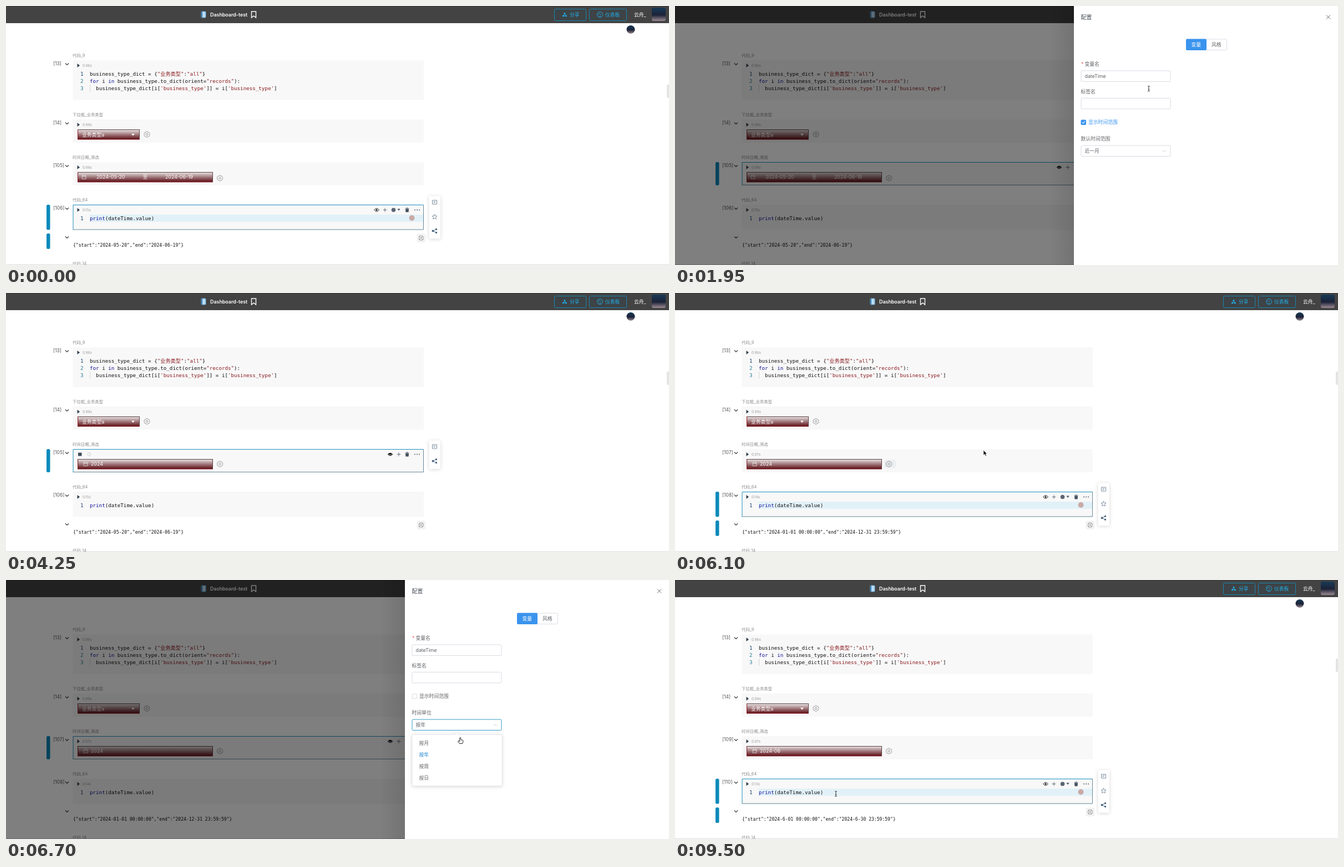
Recreate the animation shown at these times as an HTML page. Size 1195 px wide and 468 px high, loop 9970 ms.

```html
<!DOCTYPE html>
<html lang="zh">
<head>
<meta charset="utf-8">
<title>Dashboard-test</title>
<style>
html, body { margin: 0; width: 100%; height: 100%; overflow: hidden; background: #fff; }
svg { display: block; width: 100vw; height: 100vh; }
text { font-family: Inter, "Noto Sans CJK SC", "Noto Sans CJK", sans-serif; white-space: pre; }
.code { font-family: "DejaVu Sans Mono", "Noto Sans CJK SC", "Noto Sans CJK", monospace; }
.float { filter: drop-shadow(0 1px 3px rgba(0,0,0,.16)); }
</style>
</head>
<body>
<svg viewBox="0 0 1195 468" preserveAspectRatio="none">
  <defs>
    <linearGradient id="wine" x2="0" y2="1">
      <stop stop-color="#e9e3e3"/><stop offset=".45" stop-color="#a78386"/><stop offset="1" stop-color="#5d0d14"/>
    </linearGradient>
    <linearGradient id="photo" x2="0" y2="1">
      <stop stop-color="#173a56"/><stop offset=".55" stop-color="#1c2238"/><stop offset="1" stop-color="#9d8b93"/>
    </linearGradient>
    <linearGradient id="edge"><stop stop-opacity="0"/><stop offset="1" stop-opacity=".16"/></linearGradient>
  </defs>
  <g id="scene"></g>
</svg>
<script>
const LOOP = 9970;
const BLUE = '#0a8abb', PRIMARY = '#3a94ee', INK = '#44505e', GREY = '#606266', NAVY = '#10109a', RED = '#8a1a1e';

// Cursor: time, x, y, shape used from this time on ('' hides it)
const CURSOR = [
  [0, 290, 386, ''], [250, 290, 386, 'beam'], [500, 330, 360, 'arrow'], [1100, 385, 307, 'hand'],
  [1200, 385, 307, 'arrow'], [1300, 843, 247, 'arrow'], [1750, 853, 160, 'beam'], [1950, 854, 149, 'beam'],
  [2100, 850, 152, 'arrow'], [2350, 737, 208, 'hand'], [2600, 737, 208, 'arrow'], [2800, 812, 260, 'hand'],
  [2950, 812, 260, 'hand'], [3200, 778, 296, 'hand'], [3350, 770, 338, 'hand'], [3500, 760, 314, 'hand'],
  [4200, 760, 314, ''], [4400, 560, 325, 'arrow'], [4700, 320, 378, 'beam'], [4850, 290, 386, 'beam'],
  [5900, 290, 386, 'arrow'], [6000, 386, 307, 'arrow'], [6100, 554, 284, 'arrow'], [6250, 840, 262, 'arrow'],
  [6400, 815, 261, 'hand'], [6550, 815, 261, 'hand'], [6700, 819, 285, 'hand'], [6850, 790, 296, 'hand'],
  [6900, 786, 296, 'hand'], [7700, 786, 296, ''], [7900, 560, 330, 'arrow'], [8450, 320, 378, 'beam'],
  [8650, 290, 386, 'beam'], [LOOP, 290, 386, 'beam']
];

const clamp = v => Math.max(0, Math.min(1, v));
const ramp = (t, start, length) => clamp((t - start) / length);
const easeOut = p => 1 - (1 - p) ** 2.2;
// Last value whose start time has passed
const at = (t, ...steps) => steps.filter(s => s[0] <= t).pop()[1];
const within = (t, ...spans) => spans.some(([a, b]) => t >= a && t < b);

const escape = s => String(s).replace(/&/g, '&amp;').replace(/</g, '&lt;');
const text = (x, y, s, size = 8.8, fill = GREY, extra = '') =>
  `<text x="${x}" y="${y + size * .36}" font-size="${size}" fill="${fill}" ${extra}>${escape(s)}</text>`;
const rect = (x, y, w, h, fill = 'none', stroke = 'none', r = 0, extra = '') =>
  `<rect x="${x}" y="${y}" width="${w}" height="${h}" rx="${r}" fill="${fill}" stroke="${stroke}" ${extra}/>`;
const circle = (x, y, r, fill = 'none', stroke = 'none', extra = '') =>
  `<circle cx="${x}" cy="${y}" r="${r}" fill="${fill}" stroke="${stroke}" ${extra}/>`;
const line = (x, y, d, stroke = INK, width = 1, fill = 'none') =>
  `<path transform="translate(${x} ${y})" d="${d}" stroke="${stroke}" stroke-width="${width}" fill="${fill}"/>`;
const shape = (x, y, d, fill = INK) => line(x, y, d, 'none', 0, fill);
// Code as [text, colour] pairs
const code = (x, y, parts, size = 9.2) =>
  `<text class="code" x="${x}" y="${y + size * .36}" font-size="${size}" style="font-family:'DejaVu Sans Mono','Noto Sans CJK SC',monospace">` +
  parts.map(([s, fill = '#111']) => `<tspan fill="${fill}">${escape(s)}</tspan>`).join('') + '</text>';

const icons = {
  chevron: (x, y) => line(x, y, 'M-3 -1.5L0 1.5L3 -1.5', '#333', 1.1),
  play: (x, y) => shape(x, y, 'M-2 -3.5L2.5 0L-2 3.5Z', '#333f4d'),
  plus: (x, y) => line(x, y, 'M-3.5 0H3.5M0 -3.5V3.5', INK, .8),
  dots: (x, y) => [-4, 0, 4].map(d => circle(x + d, y, .9, INK)).join(''),
  trash: (x, y) => shape(x, y, 'M-3.5 -3H-1V-4H1V-3H3.5V-2H-3.5ZM-3 -1.4H3L2.6 4H-2.6Z'),
  eye: (x, y) => line(x, y, 'M-4.5 0Q0 -5.5 4.5 0Q0 5.5 -4.5 0Z', '#222', 1) + circle(x, y, 1.5, '#222'),
  shut: (x, y) => shape(x, y, 'M-4.8 0Q0 -5.4 4.8 0Q0 5.4 -4.8 0Z', '#111') + line(x, y, 'M-3 .4Q0 2 3 .4', '#fff', .8),
  gear: (x, y) => line(x, y, 'M-1.3 -5H1.3L2 -3.6L4 -3.4L5.2 -1.2L4.4 0L5.2 1.2L4 3.4L2 3.6L1.3 5H-1.3L-2 3.6L-4 3.4L-5.2 1.2L-4.4 0L-5.2 -1.2L-4 -3.4L-2 -3.6Z', '#888', .8) +
    circle(x, y, 1.8, 'none', '#888', 'stroke-width=".8"'),
  calendar: (x, y) => line(x, y, 'M-3.5 -3H3.5V3.5H-3.5ZM-3.5 -.8H3.5M-1.7 -4V-2.2M1.7 -4V-2.2', '#eee', .7),
  comment: (x, y) => line(x, y, 'M-4 -4H4V3H1L0 4.2L-1 3H-4ZM-2 -1.7H2M-2 .6H1', '#5e7387', .8),
  star: (x, y) => line(x, y, 'M0 -4.5L1.3 -1.5L4.5 -1.2L2.1 1L2.8 4.2L0 2.6L-2.8 4.2L-2.1 1L-4.5 -1.2L-1.3 -1.5Z', '#5e7387', .8),
  share: (x, y) => line(x, y, 'M3 -3L-3 0L3 3', '#46607a', .9) + circle(x - 3, y, 1.9, '#46607a') +
    circle(x + 3, y - 3, 1.6, '#46607a') + circle(x + 3, y + 3, 1.6, '#46607a')
};

function header() {
  const button = (x, w, label, tx) => rect(x + .5, 5.5, w, 21, '#3d4346', '#1788b3', 2) + text(tx, 15.5, label, 8.8, '#20b0ea');
  return rect(0, 0, 1195, 31, '#434343') + rect(0, 0, 1195, 1, '#343434') +
    rect(352, 10, 8, 11, '#b9dcf4', '#6da6cf', 1) + rect(352, 10, 2, 11, '#3b7eb3') +
    text(368, 15.5, 'Dashboard-test', 8.9, '#fff', 'font-weight="600"') +
    line(446.5, 15.5, 'M-4 -5.5H4V5.5L0 2.4L-4 5.5Z', '#fff', 1.4) +
    button(988, 57, '分享', 1016) + button(1051, 67, '仪表板', 1080) +
    line(1007, 16, 'M0 -2L-2.5 2H2.5Z', '#20b0ea', 1) + [[0, -2.5], [-2.7, 2], [2.7, 2]].map(([x, y]) => circle(1007 + x, 16 + y, 1.4, '#20b0ea')).join('') +
    circle(1070.5, 15.5, 5, 'none', '#20b0ea', 'stroke-width=".9"') + line(1070.5, 16, 'M0 1L2 -2M-3 0A3 3 0 0 1 0 -3M-2 3H2', '#20b0ea', .8) +
    text(1132, 15.5, '云舟_', 8.8, '#fff') + rect(1164, 3, 25, 24, 'url(#photo)', 'none', 3) +
    circle(1126, 42.5, 7.5, 'url(#photo)');
}

function cell(y, h, title, number, time, running, barHeight = h) {
  const label = `[${number}]`;
  return text(120, y - 9, title, 7.4, '#8a8a8a') + rect(120.5, y, 632.5, h, '#f8f8f8') +
    text(85, y + 6, label, 8.5, '#555') + icons.chevron(110, y + 7) +
    (running
      ? rect(130, y + 6.5, 6.5, 6, '#3f4a5c') + circle(150, y + 9.5, 2.8, 'none', '#aaa', 'stroke-dasharray="1.3 .9"')
      : icons.play(130.5, y + 9.5) + text(138, y + 10, time, 6.3, '#999'));
}

const selection = (y, h) => rect(73, y, 6.5, h, BLUE, 'none', 2.5) +
  line(0, 0, `M121 ${y + h}V${y + .5}H752.5`, '#1f8fbd') + line(0, 0, `M121 ${y + h - .5}H752.5V${y + .5}`, '#66879a');

function tools(y, names) {
  return `<g class="float">${rect(762.5, y - 11.5, 20.5, names.length * 25.7, '#fff', 'none', 2)}</g>` +
    names.map((name, i) => icons[name](772.5, y + i * 25.7)).join('');
}

function dateCell(t, selected) {
  const running = within(t, [4200, 4500], [7700, 8000]);
  const value = at(t, [0, ''], [4200, '2024'], [7700, '2024-06']);
  const gearY = value ? 309 : 311;
  const hover = within(t, [1100, 1250], [5980, 6150]);
  let out = cell(282, 42, '时间日期_筛选', at(t, [0, 105], [4500, 107], [8000, 109]), at(t, [0, '0.06s'], [4500, '0.07s']), running) +
    rect(129.5, 300.5, 243, 17.5, 'url(#wine)', '#7d1820') + line(0, 0, 'M129.5 300.5H372.5V318', '#5b4346');
  out += value
    ? icons.calendar(143.5, 309) + text(153, 309, value, 8.8, '#fff')
    : icons.calendar(140.5, 309) + text(163, 309, '2024-05-20', 8.8, '#fff') + text(246.5, 309, '至', 8.8, '#fff') + text(287, 309, '2024-06-19', 8.8, '#fff');
  if (hover) out += rect(377, gearY - 7.5, 21, 15, '#eceef0', 'none', 3);
  out += icons.gear(385.5, gearY);
  if (selected) out += selection(282, 42) + icons.shut(692.5, 291.5) + icons.plus(708, 291.5) +
    icons.trash(723, 291.5) + icons.dots(741, 291.5) + tools(278, ['comment', 'share']);
  return out;
}

function codeCell(t, selected) {
  const running = within(t, [5100, 5500], [9000, 9150]);
  const range = at(t, [0, ['2024-05-20', '2024-06-19']], [5500, ['2024-01-01 00:00:00', '2024-12-31 23:59:59']],
    [9150, ['2024-6-01 00:00:00', '2024-6-30 23:59:59']]);
  let out = cell(359, 45.5, '代码_64', at(t, [0, 106], [5500, 108], [9150, 110]), at(t, [0, '0.15s'], [5500, '0.14s'], [9150, '0.13s']), running);
  if (selected) out += rect(151, 377, 601, 13, '#e2f1f8');
  out += code(134, 383.5, [['1', '#123a6b']]) + code(151, 383.5, [['print', NAVY], ['(dateTime.value)']]);
  if (selected) out += selection(359, 45.5) + rect(73, 411, 6.5, 28, BLUE, 'none', 2.5) +
    icons.eye(668, 368.5) + icons.plus(683, 368.5) + circle(698.5, 368.5, 3.8, '#5d6773') + shape(708, 368, 'M-2.5 -1.5H2.5L0 2Z') +
    icons.trash(723, 368.5) + icons.dots(741, 368.5) + circle(731.5, 383, 5, '#c9a9a6') +
    tools(355, ['comment', 'star', 'share']);
  return out + icons.chevron(110, 418) + rect(741.5, 412.5, 13.5, 13.5, '#fff', '#ddd', 2) +
    rect(744.5, 415.5, 7.5, 7.5, 'none', '#666', 1, 'stroke-width=".8"') + line(748.2, 419.2, 'M-2.5 -2.5L2.5 2.5M2.5 -2.5L-2.5 2.5', '#666', .8) +
    code(121, 432.5, [[`{"start":"${range[0]}","end":"${range[1]}"}`]], 8.07);
}

function notebook(t) {
  const dateSelected = within(t, [1250, 5000], [6150, 8950]);
  return rect(0, 0, 1195, 468, '#fff') + header() +
    cell(98, 72, '代码_9', 13, '0.96s') +
    [1, 2, 3].map(n => code(134, 109.5 + n * 13.1, [[n, n > 1 ? '#237893' : '#123a6b']])).join('') +
    code(151, 122.5, [['business_type_dict = {'], ['"业务类型"', RED], [':'], ['"all"', RED], ['}']]) +
    code(151, 135.5, [['for', NAVY], [' i '], ['in', NAVY], [' business_type.to_dict(orient='], ['"records"', RED], ['):']]) +
    code(162.1, 148.7, [['business_type_dict[i['], ["'business_type'", RED], [']] = i['], ["'business_type'", RED], [']']]) +
    rect(151, 142, 1, 13, '#d6d6d6') +
    cell(205, 42, '下拉框_业务类型', 14, '0.99s') +
    rect(129.5, 223.5, 111, 17.5, 'url(#wine)', '#8c1820') + line(0, 0, 'M129.5 223.5H240.5V241', '#5b4346') +
    text(137, 232.5, '业务类型a', 8.8, '#fff') + shape(229, 232.5, 'M-3 -1.7H3L0 2Z', '#fff') + icons.gear(254, 232) +
    dateCell(t, dateSelected) + codeCell(t, !dateSelected) +
    text(120, 465, '代码_14', 7.4, '#8a8a8a') + rect(0, 467, 1195, 1, '#dcdcdc') + rect(1191, 142, 5, 24, '#e4e4e4', 'none', 2);
}

function drawer(t) {
  const start = t < 5000 ? 1210 : 6150;
  if (!within(t, [1210, 4200], [6150, 7700])) return '';
  const p = easeOut(ramp(t, start, 240));
  const shift = (1 - p) * 476, left = 719 + shift;
  const ranged = t < 2400;
  const unit = at(t, [0, '按日'], [3600, '按年'], [7050, '按月']);
  const open = t < 5000 ? ramp(t, 2850, 150) - ramp(t, 3650, 150) : ramp(t, 6450, 150) - ramp(t, 7100, 180);
  const focused = t < 5000 ? t >= 2850 : t >= 6450;
  const field = (y, value = '', stroke = '#d8dbe2') => rect(732, y, 161, 19.5, '#fff', stroke, 1.5) + text(738.5, y + 10, value);
  let form = rect(719, 0, 476, 468, '#fff') + text(731.5, 20, '配置', 9.9, '#444b55') +
    line(1177.5, 20, 'M-3.5 -3.5L3.5 3.5M3.5 -3.5L-3.5 3.5', '#555', .9) +
    rect(921.5, 60, 73, 19.5, '#fff', '#dcdfe6', 2) + rect(921, 59.5, 37, 20.5, PRIMARY, 'none', 2) +
    text(930.5, 70, '变量', 8.8, '#fff') + text(967, 70, '风格') +
    text(732, 105, '*', 8.8, '#f05a5a') + text(738.5, 105, '变量名') + field(117, 'dateTime') +
    text(731.5, 155, '标签名') + field(166.5) +
    rect(732, 206, 8.5, 8.5, ranged ? PRIMARY : '#fff', ranged ? PRIMARY : '#d8dbe2', 1) +
    (ranged ? line(736.2, 210.2, 'M-2.3 0L-.5 1.8L2.4 -1.8', '#fff', 1.1) : '') +
    text(745, 210, '显示时间范围', 8.8, ranged ? PRIMARY : GREY) +
    text(731.5, 240, ranged ? '默认时间范围' : '时间单位') +
    field(252, ranged ? '近一月' : unit, focused ? '#359cc6' : undefined) +
    `<g transform="translate(882 262) scale(1 ${1 - 2 * open})">${line(0, 0, 'M-3 -1.5L0 1.5L3 -1.5', '#c0c4cc', .9)}</g>`;
  if (open > 0) form += `<g opacity="${open}" transform="translate(0 ${279 * (1 - open)}) scale(1 ${open})"><g class="float">` +
    rect(732, 279.5, 162, 92.5, '#fff', '#e8eaef', 2) + line(812, 279.5, 'M-4 0L0 -4L4 0', '#e8eaef', 1, '#fff') + '</g>' +
    ['按月', '按年', '按周', '按日'].map((s, i) => text(744.5, 294.5 + i * 21, s, 8.8, s === unit ? '#1f86d0' : GREY)).join('') + '</g>';
  return rect(0, 0, left, 468, '#000', 'none', 0, `opacity="${p * .5}"`) +
    rect(left - 45, 0, 45, 468, 'url(#edge)', 'none', 0, `opacity="${p * .6}"`) +
    `<g transform="translate(${shift} 0)" opacity="${p}">${form}</g>`;
}

function pointer(t) {
  const i = CURSOR.findIndex((k, n) => t < CURSOR[n + 1][0]);
  const [t0, x0, y0, kind] = CURSOR[i], [t1, x1, y1] = CURSOR[i + 1];
  const p = (t - t0) / (t1 - t0);
  const x = x0 + (x1 - x0) * p, y = y0 + (y1 - y0) * p;
  if (kind === 'arrow') return line(x, y, 'M0 0V9.5L2.2 7.5L3.8 11L5.5 10.2L4 6.9H6.8Z', '#fff', .8, '#111');
  if (kind === 'beam') return line(x, y, 'M-2 -4.5Q0 -4.5 0 -3Q0 -4.5 2 -4.5M0 -3V3.5M-2 5Q0 5 0 3.5Q0 5 2 5M-1 1.5H1', '#222', .9);
  if (kind === 'hand') return line(x, y, 'M-1 0Q0 -1 1 0V3.5L4.5 4.5Q5.5 5 5 7L4 10.5H-1.5L-4 6.5Q-4.2 5 -2.5 5.6L-1 7Z', '#111', .9, '#fff');
  return '';
}

const scene = document.getElementById('scene');
let shown = '';
function frame() {
  const t = performance.now() % LOOP;
  const markup = notebook(t) + drawer(t) + pointer(t);
  if (markup !== shown) scene.innerHTML = shown = markup;
  requestAnimationFrame(frame);
}
frame();
</script>
</body>
</html>
```
